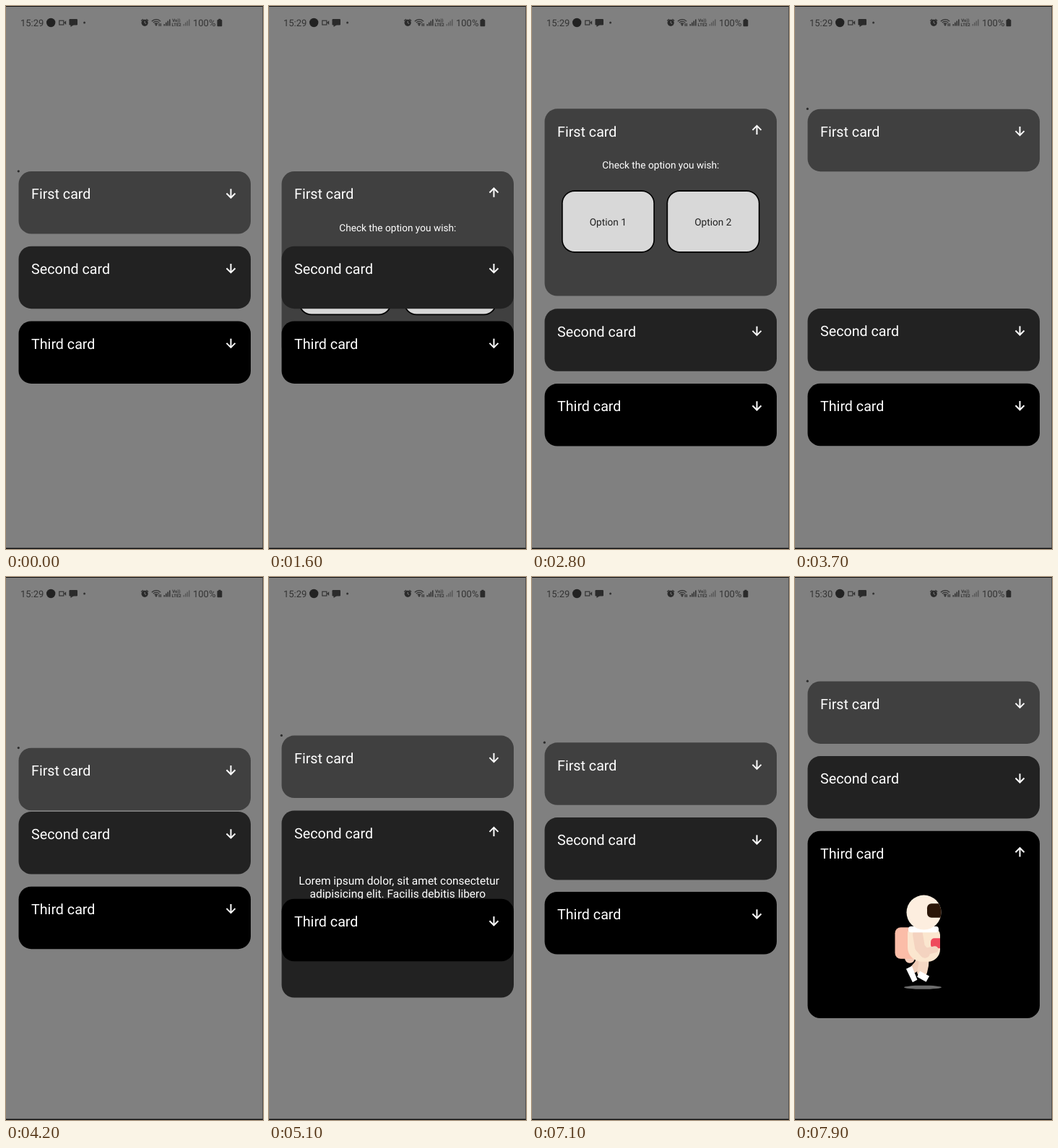
These frames come from a looping animation (356 px wide and 752 px high, 8000 ms). An HTML page with a canvas:

```html
<!DOCTYPE html>
<html lang="en">
<head>
<meta charset="utf-8">
<title>Expanding cards</title>
<style>
  html, body { margin: 0; width: 100%; height: 100%; overflow: hidden; background: #808080; }
  canvas { display: block; width: 356px; height: 752px; }
</style>
</head>
<body>
<canvas id="stage"></canvas>
<script>
const W = 356, H = 752, LOOP = 8000;
const canvas = document.getElementById('stage');
const ctx = canvas.getContext('2d');
const dpr = window.devicePixelRatio || 1;
canvas.width = W * dpr;
canvas.height = H * dpr;

const FONT = 'Roboto, sans-serif';
const INK = '#333333';
const MID = 178.3;
const CARD = { x: 17.5, w: 321.5, top: 229, pitch: 103.7, closed: 86.5, open: 259.2, r: 17.5 };
const SHIFT = (CARD.open - CARD.closed) / 2;

// grow/shrink: the height jumps; rise/fall: the column springs to its new layout
const cards = [
  { title: 'First card', color: '#404040', grow: 1590, rise: 1637, shrink: 3490, fall: 3718, content: drawOptions },
  { title: 'Second card', color: '#222222', grow: 4990, rise: 5050, shrink: 5990, fall: 6030, content: drawLorem },
  { title: 'Third card', color: '#000000', grow: 7190, rise: 7240, shrink: Infinity, fall: Infinity, content: drawWalker }
];

const LOREM = [
  ' Lorem ipsum dolor, sit amet consectetur',
  'adipisicing elit. Facilis debitis libero',
  'cumque asperiores. Sequi eaque ex',
  'dolore rem quaerat quae! Beatae sed',
  'ipsam exercitationem eum cupiditate',
  'fugiat reprehenderit obcaecati ea. '
];

// Spring with mass 1, stiffness 100, damping 10
function spring(ms) {
  if (ms <= 0) return 0;
  const s = ms / 1000, w = Math.sqrt(75);
  return 1 - Math.exp(-5 * s) * (Math.cos(w * s) + 5 / w * Math.sin(w * s));
}

function cardTop(i, t) {
  let y = CARD.top + CARD.pitch * i;
  cards.forEach((c, k) => {
    const open = spring(t - c.rise) - spring(t - c.fall);
    y += (i <= k ? -SHIFT : SHIFT) * open;
  });
  return y;
}

function text(str, x, y, size, color = '#fff', align = 'left', weight = 400) {
  ctx.font = `${weight} ${size}px ${FONT}`;
  ctx.textRendering = 'geometricPrecision';
  ctx.fillStyle = color;
  ctx.textAlign = align;
  ctx.fillText(str, x, y);
}

function box(x, y, w, h, r, color) {
  ctx.fillStyle = color;
  ctx.beginPath();
  ctx.roundRect(x, y, w, h, r);
  ctx.fill();
}

function oval(x, y, rx, ry, color) {
  ctx.fillStyle = color;
  ctx.beginPath();
  ctx.ellipse(x, y, rx, ry, 0, 0, Math.PI * 2);
  ctx.fill();
}

function shape(points, color) {
  ctx.fillStyle = color;
  ctx.beginPath();
  points.forEach(([x, y]) => ctx.lineTo(x, y));
  ctx.fill();
}

function line(points, width, color, cap = 'butt') {
  ctx.strokeStyle = color;
  ctx.lineWidth = width;
  ctx.lineCap = cap;
  ctx.lineJoin = cap === 'round' ? 'round' : 'miter';
  ctx.beginPath();
  points.forEach(([x, y]) => ctx.lineTo(x, y));
  ctx.stroke();
}

function arrow(x, y, dir) {
  line([[x, y - 6.5 * dir], [x, y + 5.5 * dir]], 2, '#fff');
  line([[x - 6, y - 0.3 * dir], [x, y + 5.7 * dir], [x + 6, y - 0.3 * dir]], 2, '#fff');
}

function drawOptions(y) {
  text('Check the option you wish:', MID, y + 82.6, 13.65, '#fff', 'center');
  [41, 186.5].forEach((x, i) => {
    box(x, y + 113, 129, 86.3, 18, '#000');
    box(x + 1.7, y + 114.7, 125.6, 82.9, 16.3, '#d8d8d8');
    text('Option ' + (i + 1), x + 64.3, y + 161.3, 13.65, '#222', 'center');
  });
}

function drawLorem(y) {
  const pad = 1.9;
  LOREM.forEach((row, i) => {
    const nudge = row[0] === ' ' ? pad : row.endsWith(' ') ? -pad : 0;
    text(row.trim(), MID + nudge, y + 102.6 + 18.2 * i, 15.5, '#fff', 'center');
  });
}

function swing(x, y, angle, draw) {
  ctx.save();
  ctx.translate(x, y);
  ctx.rotate(angle);
  ctx.translate(-x, -y);
  draw();
  ctx.restore();
}

function drawWalker(y, t) {
  const step = Math.sin((t - 7900) / 1000 * Math.PI * 2) * 0.3;
  ctx.save();
  ctx.translate(0, y);
  oval(177, 216.5, 26, 2.6, '#6c6c6c');
  oval(159, 176, 7, 7, '#f5cdba');
  box(138.5, 133.5, 30, 43.5, 8, '#fbbda8');
  swing(176, 170, step, () => {
    line([[176, 172], [171, 184], [165, 191]], 11, '#efcdb8', 'round');
    shape([[154, 191], [162, 187], [169.5, 206], [163, 209.5]], '#fff');
  });
  swing(177, 170, -step, () => {
    line([[179, 170], [178, 186], [176, 195]], 14, '#f4d8c4', 'round');
    shape([[173, 194], [186, 201], [181.5, 209], [169, 202]], '#fff');
  });
  box(156, 134, 45, 47, [8, 10, 17, 20], '#fbe6cf');
  box(188, 148.5, 13, 14, [5, 0, 0, 5], '#ef4a5c');
  swing(170, 145, step * 0.3, () => {
    line([[170, 143], [173, 161], [180, 169]], 14, '#f4d3c0', 'round');
    line([[180, 167], [194, 164]], 9, '#f4d3c0', 'round');
  });
  box(157, 132, 42, 8.5, 4, '#fff');
  oval(178.5, 112.8, 24, 24, '#fdeedf');
  ctx.beginPath();
  ctx.arc(178.5, 112.8, 24, 0, Math.PI * 2);
  ctx.clip();
  box(183, 100.5, 22, 19.5, [6, 0, 0, 6], '#2b1608');
  ctx.restore();
}

function drawCard(c, i, t) {
  const y = cardTop(i, t);
  const open = t >= c.grow && t < c.shrink;
  box(CARD.x, y, CARD.w, open ? CARD.open : CARD.closed, CARD.r, c.color);
  if (i === 0 && !open) oval(17.3, y - 0.2, 1.6, 1.6, '#2c2c2c');
  text(c.title, 35, y + 38.2, 19.7);
  arrow(311.5, y + (open ? 29.2 : 30.8), open ? -1 : 1);
  if (open) c.content(y, t);
}

function bars(x, color) {
  for (let i = 0; i < 4; i++) {
    const h = 2.5 + i * 2.2;
    box(x + i * 2.5, 27.5 - h, 1.6, h, 0, color);
  }
}

function drawStatus(t) {
  text(t < 7600 ? '15:29' : '15:30', 20, 28, 13, INK);
  oval(62.2, 23, 6.2, 6.2, '#222');

  ctx.strokeStyle = INK;
  ctx.lineWidth = 1.2;
  ctx.strokeRect(73.8, 20.2, 6, 5.8);
  shape([[80, 23], [83.2, 20.3], [83.2, 26]], INK);

  box(87.5, 18, 11.5, 8.4, 1.2, '#2b2b2b');
  shape([[89.5, 26], [94, 26], [89.5, 29]], '#2b2b2b');
  oval(108.6, 23, 1.5, 1.5, INK);

  oval(192.2, 23.3, 4.6, 4.6, '#2b2b2b');
  line([[187.2, 20.5], [190, 18.2]], 1.4, INK);
  line([[194.4, 18.2], [197.2, 20.5]], 1.4, INK);
  line([[192.2, 20.8], [192.2, 23.5], [194.2, 24.6]], 1, '#808080');

  ctx.strokeStyle = INK;
  ctx.lineWidth = 1.3;
  [3, 5.7, 8.4].forEach(r => {
    ctx.beginPath();
    ctx.arc(208, 27, r, -Math.PI * 0.76, -Math.PI * 0.24);
    ctx.stroke();
  });
  oval(208, 26.3, 1.2, 1.2, INK);
  line([[212.2, 24], [212.2, 28]], 1.2, INK);
  line([[214.4, 24], [214.4, 28]], 1.2, INK);

  bars(218.5, INK);
  text('Vo))', 236, 22.3, 6, INK, 'center', 700);
  text('LTE2', 236.2, 28.2, 6, INK, 'center', 700);
  bars(245.5, '#5a5a5a');
  text('100%', 259, 28, 13, INK);
  box(292.5, 19, 6.8, 9.3, 1, '#2b2b2b');
  box(294.3, 17.8, 3.2, 1.6, 0, '#2b2b2b');
}

function draw(t) {
  ctx.setTransform(dpr, 0, 0, dpr, 0, 0);
  box(0, 0, W, H, 0, '#808080');
  drawStatus(t);
  cards.forEach((c, i) => drawCard(c, i, t));
  box(0, 0, W, 1, 0, '#111');
  box(0, H - 1.4, W, 1.4, 0, '#111');
  box(W - 0.6, 0, 0.6, H, 0, '#333');
}

const start = performance.now();
function frame() {
  draw((performance.now() - start) % LOOP);
  requestAnimationFrame(frame);
}
frame();
</script>
</body>
</html>
```
